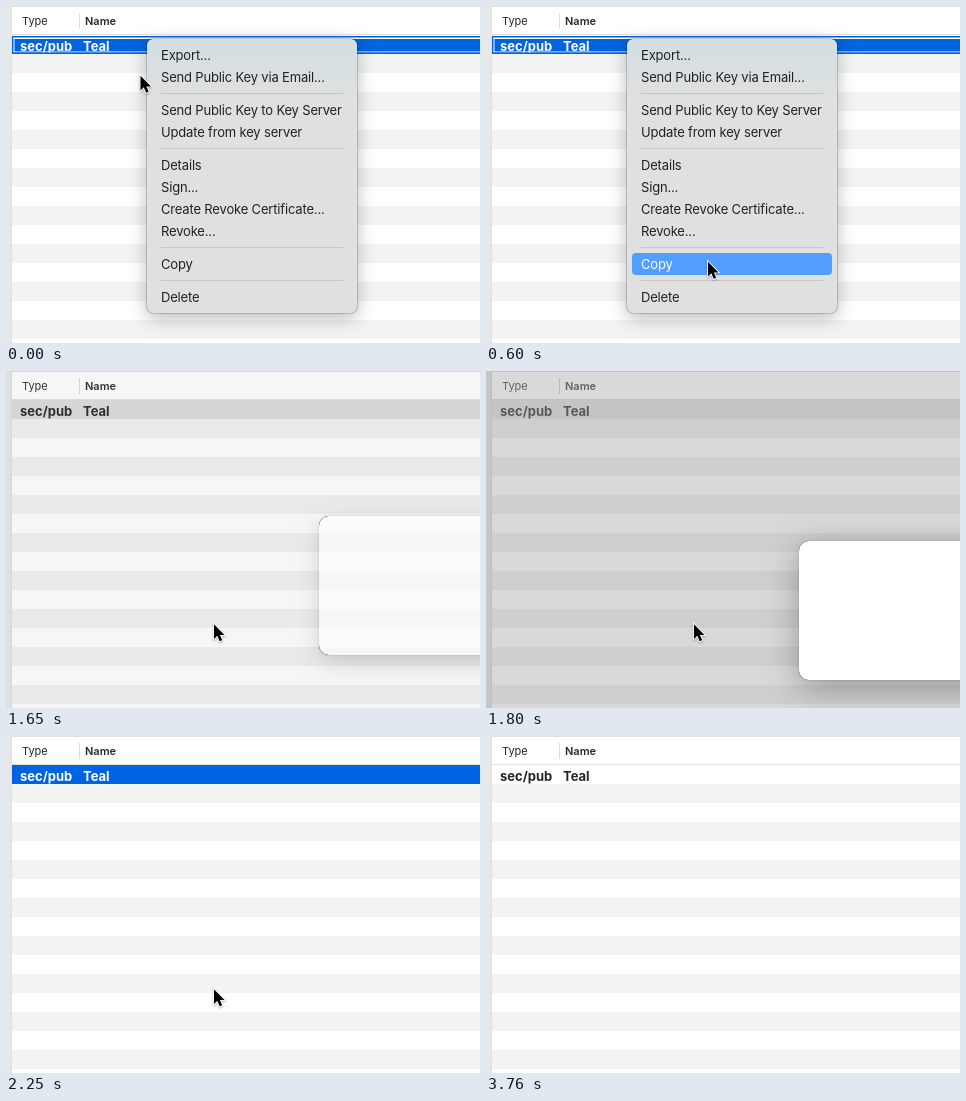
An HTML page with a canvas that plays this animation: 474 px wide and 337 px high, repeating every 4.19 s.

```html
<!DOCTYPE html>
<html>
<head>
<meta charset="utf-8">
<style>
  html, body { margin: 0; width: 100%; height: 100%; overflow: hidden; }
  canvas { display: block; }
</style>
</head>
<body>
<canvas id="stage" width="474" height="337"></canvas>
<script>
const ctx = document.getElementById('stage').getContext('2d');
const W = 474, H = 337, LOOP = 4190;

const ITEMS = [
  ['Export...', 49], ['Send Public Key via Email...', 71],
  ['Send Public Key to Key Server', 104], ['Update from key server', 126],
  ['Details', 159], ['Sign...', 181], ['Create Revoke Certificate...', 203],
  ['Revoke...', 225], ['Copy', 258], ['Delete', 291]
];
const SEPARATORS = [87, 142, 241, 274];

// Each step inherits whatever it does not set.
const SELECTED = '#0063e1';
const SHEET_OPEN = { y: 170, fill: '#fff', shadow: .3, blur: 34 };
const STEPS = [
  { at: 0, cursor: [134, 69], menu: true, hover: '', ring: true, row: SELECTED, rowText: '#fff', ink: '#262626', dim: 0, sheet: null },
  { at: 150, cursor: [200, 205.5], hover: 'Sign...' },
  { at: 300, cursor: [218, 253.5], hover: 'Copy' },
  { at: 450, cursor: [223, 268.5], hover: '' },
  { at: 600, cursor: [221.5, 255], hover: 'Copy' },
  { at: 750, cursor: [219.5, 254.5] },
  { at: 900, cursor: [210, 252.5] },
  { at: 1050, cursor: [205.5, 252.5] },
  { at: 1200, cursor: [207.5, 252.5] },
  { at: 1500, menu: false },
  { at: 1650, ring: false, row: '#d6d6d6', rowText: '#2f2f2f', ink: '#333', dim: .037,
    sheet: { y: 145, fill: 'rgba(255,255,255,.6)', shadow: .14, blur: 22 } },
  { at: 1800, row: '#c5c5c5', rowText: '#575757', ink: '#626262', dim: .15, sheet: SHEET_OPEN },
  { at: 1950, rowText: '#5a5a5a', ink: '#666' },
  { at: 2100, row: '#3f79d0', rowText: '#e6e6e6', ink: '#4c4c4c', dim: .11,
    sheet: { y: 163, fill: '#f1f1f1', shadow: .14, blur: 22 } },
  { at: 2250, row: SELECTED, rowText: '#fff', ink: '#262626', dim: 0, sheet: null },
  { at: 2700, row: '#fff', rowText: '#262626' },
  { at: 3300, cursor: [294, 295] },
  { at: 3450, cursor: [412.5, 320] },
  { at: 3600, cursor: [436.5, 335] },
  { at: 3760, cursor: null }
];

function stateAt(time) {
  return Object.assign({}, ...STEPS.filter(step => step.at <= time));
}

function rect(x, y, w, h, color) {
  ctx.fillStyle = color;
  ctx.fillRect(x, y, w, h);
}

function roundRect(x, y, w, h, r) {
  ctx.beginPath();
  ctx.roundRect(x, y, w, h, r);
}

function text(str, x, y, color, size = 13, weight = 400, spacing = 0) {
  ctx.font = `${weight} ${size}px Inter, sans-serif`;
  ctx.letterSpacing = spacing + 'px';
  ctx.fillStyle = color;
  ctx.fillText(str, x, y);
}

// Casts a shadow outside a rounded box only, so translucent boxes stay clean.
function outerShadow(x, y, w, h, r, alpha, blur, offset) {
  ctx.save();
  ctx.beginPath();
  ctx.rect(0, 0, W, H);
  ctx.roundRect(x, y, w, h, r);
  ctx.clip('evenodd');
  ctx.shadowColor = `rgba(0,0,0,${alpha})`;
  ctx.shadowBlur = blur;
  ctx.shadowOffsetY = offset;
  ctx.fillStyle = '#000';
  roundRect(x, y, w, h, r);
  ctx.fill();
  ctx.restore();
}

function drawTable(s) {
  rect(0, 0, W, H, '#fff');
  for (let y = 48; y < H; y += 38) rect(6, y, W, 19, '#f2f4f4');
  rect(0, 0, 6, H, '#e8e8e8');
  rect(5, 0, 1, H, '#dedede');
  rect(6, 0, W, 1, '#e0e0e0');
  rect(6, 28, W, 1, '#e2e2e2');
  rect(73, 7, 1, 16, '#dcdcdc');
  rect(0, 0, W, H, `rgba(0,0,0,${s.dim})`);

  text('Type', 16, 19, s.ink, 11);
  text('Name', 79, 19, s.ink, 11, 600);
  rect(6, 29, W, 19, s.row);
  text('sec/pub', 14, 45, s.rowText, 13, 700);
  text('Teal', 77, 45, s.rowText, 13, 700);
  if (s.ring) {
    rect(6, 29, W, 1, '#fff');
    rect(6, 30, W, 1.5, SELECTED);
    rect(7.5, 31.5, W, 1.5, '#fff');
    rect(7.5, 45.5, W, 1, '#fff');
    rect(7.5, 31.5, 1, 15, '#fff');
    rect(6, 46.5, W, 1.5, SELECTED);
  }
}

function drawMenu(hover) {
  outerShadow(141, 33, 210, 274, 6, .27, 18, 5);
  const tint = ctx.createLinearGradient(0, 33, 0, 95);
  tint.addColorStop(0, '#d2dfe4');
  tint.addColorStop(.35, '#d6dfe1');
  tint.addColorStop(1, '#e0e0e0');
  roundRect(141, 33, 210, 274, 6);
  ctx.fillStyle = tint;
  ctx.fill();
  roundRect(140.5, 32.5, 211, 275, 6.5);
  ctx.strokeStyle = 'rgba(0,0,0,.16)';
  ctx.lineWidth = 1;
  ctx.stroke();
  for (const y of SEPARATORS) rect(155, y, 182, 1, '#c6c6c6');
  for (const [label, y] of ITEMS) {
    const active = label === hover;
    if (active) {
      roundRect(146, y - 11, 200, 22, 4);
      ctx.fillStyle = '#529fff';
      ctx.fill();
    }
    text(label, 155, y + 5, active ? '#fff' : '#222', 13, 400, -.17);
  }
}

function drawSheet({ y, fill, shadow, blur }) {
  outerShadow(313, y, 260, 139, 10, shadow, blur, 8);
  outerShadow(313, y, 260, 139, 10, .2, 2, 0);
  roundRect(313, y, 260, 139, 10);
  ctx.fillStyle = fill;
  ctx.fill();
}

const ARROW = new Path2D('M0 0V14.6L3.3 11.5L5.7 17L8.2 15.9L5.9 10.6H10.5Z');

function drawCursor([x, y]) {
  ctx.save();
  ctx.translate(x + .5, y + .8);
  ctx.shadowColor = 'rgba(0,0,0,.3)';
  ctx.shadowBlur = 2;
  ctx.shadowOffsetY = 1;
  ctx.strokeStyle = '#fff';
  ctx.lineWidth = 1.8;
  ctx.stroke(ARROW);
  ctx.shadowColor = 'transparent';
  ctx.fillStyle = '#000';
  ctx.fill(ARROW);
  ctx.restore();
}

function draw() {
  const s = stateAt(performance.now() % LOOP);
  drawTable(s);
  if (s.menu) drawMenu(s.hover);
  if (s.sheet) drawSheet(s.sheet);
  if (s.cursor) drawCursor(s.cursor);
  requestAnimationFrame(draw);
}
draw();
</script>
</body>
</html>
```
